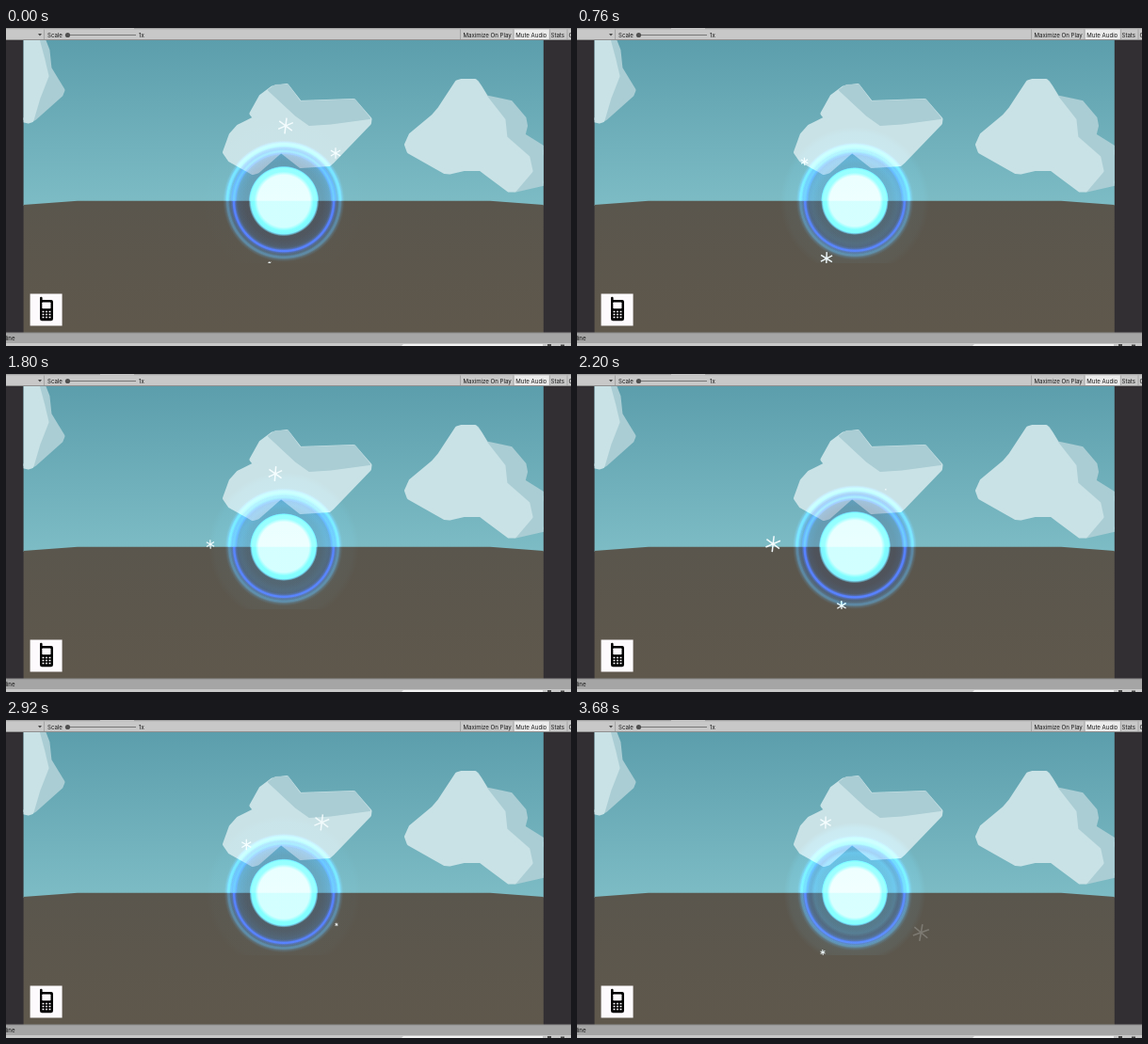
Recreate the animation shown at these times as an HTML page with a canvas. Size 600 by 338 pixels, loop 3720 ms.

```html
<!DOCTYPE html>
<html lang="en">
<head>
<meta charset="utf-8">
<title>Frost orb</title>
<style>
  html, body { margin: 0; width: 600px; height: 338px; overflow: hidden; background: #322f33; }
  svg, canvas { position: absolute; left: 0; top: 0; display: block; }
  #glow { mix-blend-mode: plus-lighter; }
  text { font: 6.1px Inter, "Liberation Sans", sans-serif; fill: #161616; }
  .lit { fill: #c9e2e6; stroke: #c9e2e6; }
  .dim { fill: #aacdd4; stroke: #aacdd4; }
  .lit, .dim { stroke-width: 5; stroke-linejoin: round; }
  .thin { stroke-width: 2; }
</style>
</head>
<body>
<svg width="600" height="338" viewBox="0 0 600 338">
  <defs>
    <linearGradient id="sky" x2="0" y2="1">
      <stop stop-color="#5c9eac"/><stop offset="1" stop-color="#7dbcc5"/>
    </linearGradient>
    <linearGradient id="soil" x2="0" y2="1">
      <stop stop-color="#5a564d"/><stop offset="1" stop-color="#5f584c"/>
    </linearGradient>
    <clipPath id="view"><path d="M18.600 13H570.800V324H18.600Z"/></clipPath>
  </defs>

  <g clip-path="url(#view)">
    <path fill="url(#sky)" d="M18 13H571V189H18Z"/>
    <path fill="url(#soil)" d="M18 188L76 183.800H514L571 188V324H18Z"/>
    <!-- left cloud -->
    <path class="dim" d="M32 8L39 11L44 24L46 43L60 66L58 71L30 96Z"/>
    <path class="lit" d="M14 8H32L39 34L43 51L34 74L27 98L24 99L14 97Z"/>
    <!-- middle cloud -->
    <path class="lit" d="M232.500 132L239 114L247 105L265 96L261 91L271 73L283 64L298 61.500L303 68L312 79.500L369 77.500L386 97L385.500 101L347 141L343 144.500L313 146.500L292 130L267 152L262 153.500L238 140Z"/>
    <path class="dim thin" d="M279 66L286 61L299 60.500L312 78.500L370 76.500L386 96L345 101.500L322 103L308 93Z"/>
    <!-- right cloud -->
    <path class="dim" d="M500 58L510 74L522 76.500L536 79.500L550 96L551.500 104L549 114L569 126.500L576 140V164L541 172L520 120Z"/>
    <path class="lit" d="M425.500 124L430 114L454 94L460 87L479 58L484 56.500L498 56.500L503 63L510 75L528 98L530 117L554 138L557 152L540 172L534 172L504 149.500L486 149.500L471 153L466 152.500L428 131Z"/>
  </g>

  <!-- phone badge -->
  <path fill="#fdfafd" d="M25.600 282.600H59.600V316.600H25.600Z"/>
  <path d="M36 287a1.300 1.300 0 0 1 2.600 0V289H48a2 2 0 0 1 2 2V309a2.300 2.300 0 0 1-2.300 2.300H38.300A2.300 2.300 0 0 1 36 309Z"/>
  <rect x="38.300" y="291.500" width="9.200" height="6.800" rx=".8" fill="#fdfafd"/>
  <path stroke="#fdfafd" stroke-width="1.700" stroke-dasharray="2 1.500" d="M38.500 301.500H47.500M38.500 304.500H47.500M38.500 307.500H47.500"/>

  <!-- toolbar -->
  <path fill="#c8c8c8" d="M0 0H600V12.500H0Z"/>
  <path fill="#a4a4a4" d="M0 0H600V1.300H0Z"/>
  <path fill="#c8c8c8" d="M100 0H136V1.300H100Z"/>
  <path fill="#8f8f8f" d="M0 12H600V13H0Z"/>
  <path fill="#ececec" d="M539.500 1.500H577V12H539.500Z"/>
  <path stroke="#9c9c9c" stroke-width=".8" d="M40.500 1.500V12M482.500 1.500V12M539 1.500V12M577.300 1.500V12M596 1.500V12"/>
  <path fill="#444" d="M34 6H38L36 8.600Z"/>
  <path stroke="#777" d="M66 7.500H138"/>
  <circle cx="65.500" cy="7.500" r="2.600" fill="#505050"/>
  <text x="44" y="9.700">Scale</text>
  <text x="141" y="9.700">1x</text>
  <text x="485.500" y="9.700">Maximize On Play</text>
  <text x="541.300" y="9.700">Mute Audio</text>
  <text x="578.500" y="9.700">Stats</text>
  <text x="597.500" y="9.700">Gizmos</text>

  <!-- lower panel -->
  <path fill="#a5a5a5" d="M0 324H600V335H0Z"/>
  <path fill="#8b8b8b" d="M0 323.500H600V324.500H0Z"/>
  <path fill="#c8c8c8" d="M0 335H600V338H0Z"/>
  <path fill="#f2f2f2" d="M422 336H570V338H420Z"/>
  <path fill="#444" d="M575 336H579V338H575ZM589 336.500H593V338H589Z"/>
  <text x="9.500" y="332" text-anchor="end">Timeline</text>
</svg>
<canvas id="orb" width="600" height="338"></canvas>
<canvas id="glow" width="600" height="338"></canvas>

<script>
const LOOP = 3720, STEP = 40, PULSE = 1020;
const CX = 295, CY = 184, FLOOR = 250;
const orb = document.getElementById('orb').getContext('2d');
const glow = document.getElementById('glow').getContext('2d');

// x, y, time (s) and age (s) at which each flake passes that place
const flakes = [
  [297, 104, 0, .75], [350, 133, 0, .44], [280, 250, 0, .13],
  [265, 245, .76, .54], [234, 136, 1.2, .74], [349, 152, 1.2, .36],
  [286, 106, 1.8, .66], [217, 181, 1.8, .34], [279, 255, 2.6, .8],
  [332, 115, 2.6, .44], [251, 127, 3.24, .75], [357, 221, 3.24, .44],
  [264, 109, 3.68, .5], [261, 247, 3.68, .2]
];

function disc(ctx, r, stops) {
  const g = ctx.createRadialGradient(CX, CY, 0, CX, CY, r);
  for (const [at, rgb, a] of stops) g.addColorStop(at, `rgba(${rgb},${a})`);
  ctx.fillStyle = g;
  ctx.beginPath();
  ctx.arc(CX, CY, r, 0, 7);
  ctx.fill();
}

function ring(r, w, rgb, a) {
  const out = r + w, at = d => (r + d * w) / out;
  disc(glow, out, [
    [at(-1), rgb, 0], [at(-.5), rgb, a * .35], [at(-.15), rgb, a],
    [at(.15), rgb, a], [at(.5), rgb, a * .35], [1, rgb, 0]
  ]);
}

// The growing orb; p runs from 0 to 1 over a pulse
function body(p) {
  const k = .87 + .13 * p ** 1.2, a = Math.min(1, p / .12);
  const tint = '45,75,135', rim = '50,170,190', core = '130,195,205';
  disc(orb, 62 * k, [[0, tint, .25 * a], [.9, tint, .25 * a], [1, tint, 0]]);
  disc(glow, 38.5 * k, [
    [0, core, a], [.74, core, a], [.84, rim, a], [.93, rim, .95 * a], [1, rim, 0]
  ]);
  ring(55 * k, 12, '0,45,90', .35 * a);
  ring(52 + 1.3 * p, 3.6, '10,40,185', .55 + .25 * p);
  ring(61.5 * k, 4.5, '5,75,125', .6 * a);
}

// The previous orb, swelling and fading as a plain soft disc
function echo(p) {
  const k = 1 + .55 * p - .1 * p * p, a = (1 - p) ** 2.2;
  const halo = '12,50,70', core = '25,150,180';
  disc(glow, 62 * k, [[0, halo, .8 * a], [.72, halo, .8 * a], [.92, halo, .55 * a], [1, halo, 0]]);
  disc(glow, 38.5 * k, [[0, core, .6 * a], [.92, core, .6 * a], [1, core, 0]]);
}

function flake([x, y, at, age0], t) {
  const age = t - at + age0;
  if (age <= 0 || age > .92) return;
  const dx = x - CX, dy = y - CY, d = Math.hypot(dx, dy);
  const go = 1 + 22 * (age - age0) / d;
  const size = 9.2 * Math.sin(age * Math.PI / 2);
  orb.save();
  orb.translate(CX + dx * go, CY + dy * go);
  orb.rotate((age - .45) * .4);
  orb.globalAlpha = .95 * Math.min(1, (.92 - age) / .18);
  orb.strokeStyle = '#f8feff';
  orb.lineWidth = .7 + size * .1;
  orb.beginPath();
  for (let i = 0; i < 3; i++) {
    orb.moveTo(0, -size);
    orb.lineTo(0, size);
    orb.rotate(Math.PI / 3);
  }
  orb.stroke();
  orb.restore();
}

function draw(ms) {
  const p = (ms + 830) % PULSE / PULSE;
  for (const c of [orb, glow]) c.clearRect(0, 0, 600, 338);
  echo(p);
  body(p);
  for (const f of flakes) flake(f, ms / 1000);
}

for (const c of [orb, glow]) {
  c.beginPath();
  c.rect(19, 13, 552, FLOOR - 13);
  c.clip();
}
glow.globalCompositeOperation = 'lighter';

const start = performance.now();
function tick() {
  const ms = (performance.now() - start) % LOOP;
  draw(Math.floor(ms / STEP) * STEP);
  requestAnimationFrame(tick);
}
tick();
</script>
</body>
</html>
```
